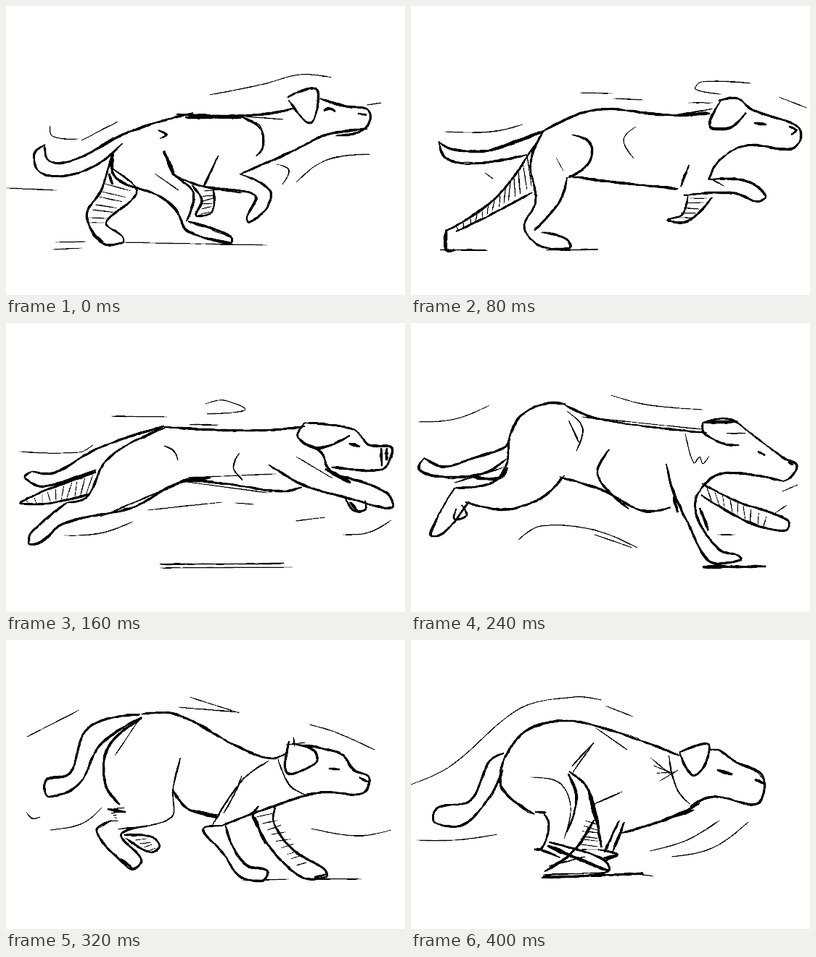
These frames come from a looping animation (550 px wide and 400 px high, 0.48 s). An HTML page:

```html
<!DOCTYPE html>
<html lang="en">
<head>
<meta charset="utf-8">
<title>Running dog</title>
<style>
html, body { margin: 0; width: 100%; height: 100%; overflow: hidden; background: #fff; }
svg { display: block; width: 100%; height: 100%; }
path { fill: #000; stroke: #000; stroke-width: .25; }
.pose { visibility: hidden; animation: show 480ms step-end infinite; animation-delay: calc(var(--i) * 80ms - 480ms); }
@keyframes show {
  0% { visibility: visible; }
  16.6666%, 100% { visibility: hidden; }
}
</style>
</head>
<body>
<!-- Pens: t thin, m medium, b bold, x heavy; data-n fills the space between two rails with hatching -->
<svg viewBox="0 0 550 400" shape-rendering="crispEdges">

<g class="pose" style="--i:0">
  <path class="t" d="M281 123 355 108 405 95 449 99M400 244 440 214 501 205M61 165 64 180 100 184M104 186 154 160M0 252 70 255M372 219 390 227 381 247M497 137 517 134"/>
  <path class="t" d="M68 327 110 326M64 337 105 335M163 327 360 331M205 232 238 255M330 153 383 157"/>
  <path class="b" d="M54 192 39 205 45 229 75 236 124 220 160 190M53 192 60 215 95 213 165 176 258 148M235 150 340 151 396 142M322 153 350 168 355 192 345 208"/>
  <path class="b" d="M498 170 440 179 395 201 325 232M388 126 427 114 430 135 419 162 390 130M433 128 465 138 498 143 502 157 490 173 455 180"/>
  <path class="x" d="M247 154 324 154M438 145 446 142 454 146M485 149 497 151M217 201 231 231M120 316 134 327M142 232 147 247"/>
  <path class="b" d="M146 205 131 255 111 290 133 328 162 327 160 318 138 300 180 258 146 225M210 172 221 178 212 183"/>
  <path class="b" d="M148 205 152 239 212 263 235 283 250 311 310 328 310 319 251 298M218 200 230 230 258 258 249 298M228 232 270 249 325 258"/>
  <path class="b" d="M293 207 272 250M256 248 270 270 262 290 284 285 286 254M322 232 364 255 360 279 335 300 332 292 345 265 330 257 272 250"/>
  <path class="t" data-n="7" d="M136 246 111 300M172 256 135 300"/>
  <path class="t" data-n="6" d="M272 256 268 288M286 255 282 285"/>
</g>

<g class="pose" style="--i:1">
  <path class="t" d="M46 174 110 174 154 164M233 120 278 121M279 128 320 130M469 107 400 105 392 115 428 122M507 126 546 141M310 167 293 185 307 211M382 134 416 134M102 231 113 239M200 210 210 228"/>
  <path class="m" d="M40 338 105 338M186 338 258 337M370 150 415 142M409 237 432 249"/>
  <path class="b" d="M38 188 48 211 85 218 160 206M38 188 60 199 110 199 184 173M120 196 178 175M183 172 258 143 350 151 412 149"/>
  <path class="b" d="M427 131 412 167 440 168 462 148M424 131 450 128 470 143 533 167 537 185 523 198 462 193 425 214 410 240M383 220 372 250"/>
  <path class="b" d="M410 240 465 243 489 263 478 271 445 259 376 262M382 263 374 289 354 296 380 299 415 265M218 235 250 240 368 253"/>
  <path class="b" d="M222 178 247 190 246 216 217 238M183 172 165 215 172 270 156 306 178 332 219 335 214 322 180 313M215 237 205 270 170 311M170 193 117 265 48 312M62 312 100 294 167 258"/>
  <path class="x" d="M473 162 490 164M521 167 531 172 524 178M49 309 49 338 61 338M365 151 410 148"/>
  <path class="t" data-n="14" d="M160 206 118 265 62 304M166 250 128 274 66 312"/>
  <path class="t" data-n="5" d="M384 266 368 293M408 266 390 293"/>
</g>

<g class="pose" style="--i:2">
  <path class="t" d="M145 129 222 130M18 178 100 179 120 169M80 294 130 291 175 275M195 259 298 248M315 249 342 251M399 274 440 269M464 293 500 290 531 273M275 112 300 107 330 120 277 126"/>
  <path class="t" d="M250 214 372 209M250 220 360 235M212 339 395 338M400 185 450 215"/>
  <path class="m" d="M212 334 383 333M218 170 231 177 237 190M322 180 314 200 326 218M253 141 293 141M130 268 238 223"/>
  <path class="b" d="M36 205 26 214 50 226 124 203M36 205 66 207 130 172 218 143M218 144 340 149 412 143M219 145 141 187 112 240 85 248M124 206 20 248 55 250 115 237"/>
  <path class="b" d="M85 248 35 290 32 306 49 303 80 277 175 255 242 220 300 222 380 233 408 227M412 138 402 158 430 173 474 156"/>
  <path class="b" d="M412 138 480 148 500 169 530 171 531 185 518 203 449 199M413 167 435 180 445 202 472 217M362 196 410 224 470 242 532 256 525 235 455 210M468 242 480 260 495 258 495 246"/>
  <path class="x" d="M240 219 282 214M473 167 488 171M517 173 518 198M525 173 525 190M440 202 475 221M474 248 486 262"/>
  <path class="t" data-n="10" d="M120 210 28 246M110 238 35 252"/>
</g>

<g class="pose" style="--i:3">
  <path class="t" d="M10 137 60 133 108 114M276 100 325 113 403 120M148 300 180 281 250 286 312 311M253 293 305 311M502 263 518 252M512 233 533 224M422 293 447 293M378 152 390 194 398 185 402 195 411 184M235 130 400 147"/>
  <path class="m" d="M215 122 236 145 228 177M218 135 231 165M60 221 128 200M435 153 461 152"/>
  <path class="b" d="M18 187 11 203 40 213 100 208 131 188M18 187 45 199 85 187 128 173 136 160M135 160 152 128 185 112 213 112M210 112 260 133 408 152M135 160 130 200 110 222 60 228"/>
  <path class="b" d="M60 228 27 293 45 291 80 247M70 252 77 266 60 272 62 257M75 248 130 258 180 242 211 211M205 213 265 232 320 260 358 255M273 175 258 212 300 257"/>
  <path class="b" d="M352 195 362 235 382 277 412 330 455 328 450 321 425 314 395 270 394 240 420 211 455 208 513 219"/>
  <path class="b" d="M402 138 404 152 430 167 452 169M402 138 440 133 467 152 514 187 532 196 526 211 513 219M401 222 445 245 520 273 518 287 470 278 400 238"/>
  <path class="x" d="M478 178 488 183M520 192 527 196M362 240 368 262M398 256 410 287M402 338 489 337M84 213 120 215 133 200M404 138 450 136"/>
  <path class="t" data-n="9" d="M408 228 490 268M415 248 485 284"/>
</g>

<g class="pose" style="--i:4">
  <path class="t" d="M29 134 101 97M253 79 322 101M237 93 322 100M418 117 455 128 508 152M421 261 485 271 531 263M28 238 36 247 47 245M60 263 105 254 132 232M185 108 150 160M325 333 390 331M415 331 490 331"/>
  <path class="m" d="M375 165 390 200 415 216M362 167 325 195 285 256M325 188 314 214 300 240M240 163 230 207 228 245 155 262M385 145 412 142M396 135 398 148"/>
  <path class="b" d="M185 103 113 122 88 185 55 194 58 217 100 200 130 145 187 107M187 103 235 103 320 148 365 164 388 156M187 108 140 150 137 200 157 228"/>
  <path class="b" d="M390 140 388 184 428 170 425 153 395 144M405 145 462 158 480 180 501 190 492 212 430 212 340 240 297 257M230 207 253 235 294 242"/>
  <path class="b" d="M298 257 272 262 300 295 322 327 355 333 360 319 332 312 312 285 302 255M348 230 341 245 370 295 410 329 442 328 440 318 395 290 370 255 371 232"/>
  <path class="b" d="M145 250 125 265 160 308 175 317 187 304 158 270 195 257M163 270 200 272 212 285 200 294 165 274"/>
  <path class="x" d="M445 178 460 179M487 190 499 196M255 236 292 245M140 234 165 238M158 303 173 315M343 245 357 282M425 329 442 324"/>
  <path class="t" data-n="9" d="M345 245 400 312M368 240 414 308"/>
  <path class="t" data-n="5" d="M172 272 196 292M190 270 206 288"/>
  <path class="m" data-n="5" d="M140 235 155 250M163 232 144 250"/>
</g>

<g class="pose" style="--i:5">
  <path class="t" d="M0 200 55 174 150 95 225 79 263 83M268 91 306 106M8 277 60 277 119 269M329 292 380 277 425 250M359 300 415 288 465 252M255 122 298 152M165 190 205 198 220 230 211 275M300 322 335 327"/>
  <path class="m" d="M355 160 367 207 385 227M252 142 222 175M250 228 291 210M182 325 268 322M190 313 240 300"/>
  <path class="b" d="M128 157 108 168 82 222 36 232 32 252 70 257 105 222 127 180M128 165 160 125 215 112 275 125 370 160M128 165 125 205 170 241"/>
  <path class="b" d="M370 155 410 144 404 175 388 187 370 155M410 152 426 153 446 168 485 189 478 226 418 217 385 230M398 226 350 249 290 267"/>
  <path class="b" d="M218 182 245 208 262 287M217 185 228 220 215 266M183 239 190 258 180 289 170 290M190 280 265 304 272 321 182 328M184 320 224 292 252 249M173 288 205 301"/>
  <path class="b" d="M287 250 266 294M294 252 277 296M258 290 284 297 266 306M180 329 320 323"/>
  <path class="x" d="M422 180 443 186M474 193 486 199M345 250 390 235M245 212 257 256M188 285 272 320M171 238 186 239M266 302 284 298"/>
  <path class="t" data-n="7" d="M240 250 230 290M256 255 258 290"/>
  <path class="t" data-n="4" d="M330 163 343 195M360 188 368 180"/>
  <path class="t" data-n="5" d="M252 142 235 165M238 162 222 185"/>
</g>
</svg>

<script>
const pens = { t: 1.1, m: 1.7, b: 2.8, x: 4.2 };
let seed = 7;
const rand = () => (seed = seed * 16807 % 2147483647) / 2147483647 - .5;
const dist = (a, b) => Math.hypot(b[0] - a[0], b[1] - a[1]);

const toPoints = text => {
  const n = text.trim().split(/\s+/).map(Number);
  return n.filter((_, i) => i % 2 === 0).map((x, i) => [x, n[2 * i + 1]]);
};

// Smooth Hermite curve, sampled about every 4 px; sharp turns stay sharp
function curve(p) {
  const end = p.length - 1, out = [p[0]];
  const slope = i => [0, 1].map(k =>
    (p[i + 1][k] - p[i - 1][k]) / (dist(p[i - 1], p[i]) + dist(p[i], p[i + 1])));
  for (let i = 0; i < end; i++) {
    const a = p[i], b = p[i + 1], len = dist(a, b), steps = Math.ceil(len / 4);
    const chord = [0, 1].map(k => b[k] - a[k]);
    let from = i > 0 && slope(i).map(v => v * len);
    let to = i + 1 < end && slope(i + 1).map(v => v * len);
    const free = other => chord.map((c, k) => other ? 1.5 * c - .5 * other[k] : c);
    from = from || free(to);
    to = to || free(from);
    for (let s = 1; s <= steps; s++) {
      const t = s / steps, u = 1 - t;
      out.push([0, 1].map(k => a[k] + chord[k] * t * t * (3 - 2 * t)
        + from[k] * t * u * u - to[k] * t * t * u));
    }
  }
  return out;
}

// Pen line with tapered ends, uneven pressure and a slight drift
function ribbon(p, width, drift) {
  const left = [], right = [], last = p.length - 1;
  let off = 0, press = 0;
  p.forEach(([x, y], i) => {
    const a = p[Math.max(i - 1, 0)], b = p[Math.min(i + 1, last)];
    const len = dist(a, b) || 1;
    const nx = (a[1] - b[1]) / len, ny = (b[0] - a[0]) / len;
    off = off * .7 + rand() * drift;
    press = press * .6 + rand() * .55;
    const h = width / 2 * Math.min(1, .5 + Math.min(i, last - i) * .2) * (1 + press);
    const at = d => (x + nx * d).toFixed(1) + ' ' + (y + ny * d).toFixed(1);
    left.push(at(off + h));
    right.unshift(at(off - h));
  });
  return 'M' + left.concat(right).join('L') + 'Z';
}

function hatch([a, b], n) {
  const pick = (rail, t) => rail[Math.round(t * (rail.length - 1))];
  return Array.from({ length: n }, (_, i) =>
    curve([pick(a, i / (n - 1)), pick(b, i / (n - 1))]));
}

for (const path of document.querySelectorAll('path')) {
  const width = pens[path.getAttribute('class')], n = +path.dataset.n;
  let lines = path.getAttribute('d').split('M').slice(1).map(s => curve(toPoints(s)));
  if (n) lines = hatch(lines, n);
  path.setAttribute('d', lines.map(line =>
    ribbon(line, width, width > 1.5 ? .7 : .2) + (width > 2 ? ribbon(line, 1, 2) : '')
  ).join(''));
}
</script>
</body>
</html>
```
